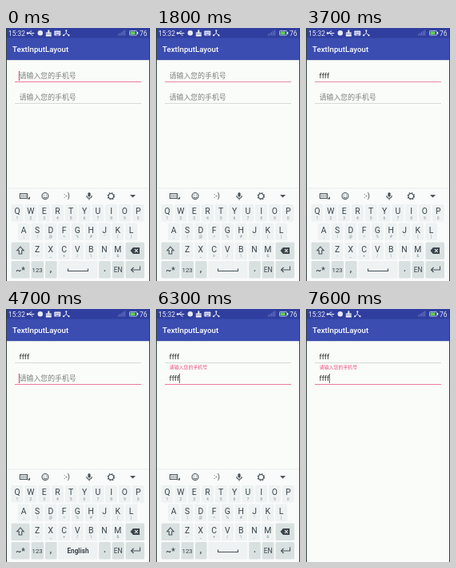
Animation, 180 px wide and 317 px high, one loop 8 s. Source, as an HTML page:

```html
<!DOCTYPE html>
<html lang="zh">
<head>
<meta charset="utf-8">
<style>
html, body { margin: 0; width: 100%; height: 100%; overflow: hidden; background: #fafcf9; }
svg { display: block; width: 100vw; height: 100vh; }
text { font-family: Roboto, "Noto Sans CJK SC", "Noto Sans CJK", sans-serif; }
.mid { text-anchor: middle; }
.icon { fill: none; stroke: #48535a; stroke-width: 1.1; }
</style>
</head>
<body>
<svg id="stage" viewBox="0 0 180 317" preserveAspectRatio="none">
  <rect width="180" height="317" fill="#fafcf9"/>
  <rect y="40" width="180" height="1" fill="#d5d9e2"/>
  <rect width="180" height="40" fill="#3b4db1"/>
  <rect width="180" height="12.5" fill="#303f9f"/>
  <text x="8" y="30" font-size="9.7" font-weight="500" fill="#fff">TextInputLayout</text>

  <g fill="#e8eaf6" font-size="8.4">
    <text x="3" y="9.5">15:32</text>
    <text x="167" y="9.5">76</text>
    <g transform="translate(-.7 0)">
      <g fill="none" stroke="#e8eaf6">
        <path d="M27 6.5H36M29 6.5L31.5 4H33M30.5 6.5L33 9H34.5"/>
        <circle cx="27.8" cy="6.5" r="1" fill="#e8eaf6"/>
      </g>
      <circle cx="43.5" cy="6.3" r="3.2"/>
      <path d="M53 2.5h2v3h2.5v2h-7v-2H53zM50.5 8h7v2.5h-7z"/>
      <g id="imeIcon">
        <rect x="61" y="3.5" width="8" height="6" rx=".7"/>
        <path d="M62 5.4h6M62 7h6" stroke="#303f9f" stroke-width=".7" stroke-dasharray="1 .7"/>
        <path d="M63.2 8.5h3.6" stroke="#303f9f" stroke-width=".7"/>
      </g>
      <g id="lastIcon">
        <path d="M76 3V6.4L72.8 9.3M76 6.4L79.2 9.3" fill="none" stroke="#e8eaf6"/>
        <circle cx="76" cy="3.3" r="1.1"/><circle cx="72.8" cy="9.2" r="1.1"/><circle cx="79.2" cy="9.2" r="1.1"/>
      </g>
    </g>
    <path d="M140.5 9.5v-2M142.5 9.5v-3.2M144.5 9.5v-4.5M146.5 9.5v-6M148.5 9.5v-7" stroke="#7480c4" stroke-width=".9"/>
    <rect x="154.5" y="3.5" width="9" height="5.6" rx=".7" fill="none" stroke="#cfd5ef" stroke-width=".8"/>
    <rect x="155.5" y="4.5" width="6" height="3.6" fill="#62d34c"/>
    <rect x="164" y="5" width="1.2" height="2.6"/>
  </g>

  <g id="fields"></g>
  <g id="keyboard"></g>
  <path d="M.5 0V317M179.5 0V317" stroke="#33413f"/>
</svg>
<script>
const LOOP = 8000, STEP = 100, PINK = '#ef7a9b', HINT = '请输入您的手机号';
const $ = id => document.getElementById(id);

function add(parent, tag, attrs = {}, content = '') {
  const el = document.createElementNS('http://www.w3.org/2000/svg', tag);
  for (const name in attrs) el.setAttribute(name, attrs[name]);
  el.textContent = content;
  parent.append(el);
  return el;
}
const set = (el, name, value) => el.setAttribute(name, value);
const show = (el, on) => set(el, 'visibility', on ? 'visible' : 'hidden');
const ramp = (t, from, to) => Math.min(1, Math.max(0, (t - from) / (to - from)));
const latest = (t, steps) => steps.filter(([at]) => t >= at).pop()[1];
const within = (t, spans) => spans.some(([from, to]) => t >= from && t < to);

function makeField(lineY) {
  const root = $('fields'), baseline = lineY - 3.6;
  const line = fill => add(root, 'rect', { x: 11, y: lineY, width: 158, height: 1, fill });
  line('#d6dad7');
  return {
    baseline,
    line: line(PINK),
    hint: add(root, 'text', { x: 16.7, y: baseline, 'font-size': 8.9, fill: '#7c807e' }, HINT),
    value: add(root, 'text', { x: 16.5, y: baseline, 'font-size': 9.1, fill: '#252827' }),
    cursor: add(root, 'rect', { y: lineY - 13, width: 1, height: 12, fill: '#d8386f' })
  };
}

const board = $('keyboard');
const KEY = '#eef2f2', FN = '#d9e0e0', INK = '#39444a';

const key = (x, y, width, fill = KEY) =>
  add(board, 'rect', { x, y, width, height: 21.5, rx: 1.5, fill });
const label = (x, y, size, content, fill = INK, weight = 400) =>
  add(board, 'text', { x, y, class: 'mid', 'font-size': size, 'font-weight': weight, fill }, content);
const icon = (d, attrs = {}) => add(board, 'path', { d, class: 'icon', ...attrs });

add(board, 'rect', { y: 201, width: 180, height: 116, fill: '#f9fbfa' });
add(board, 'rect', { y: 200.5, width: 180, height: .8, fill: '#e4e8e6' });

// Tool row
icon('M17.5 207.5H26.5V213.5H17.5Z', { 'stroke-width': .9 });
icon('M19 209.5H25.5M19 211.5H25.5', { 'stroke-dasharray': '1.1 .7' });
icon('M28 214L29.5 212.5V214Z', { 'stroke-width': .5 });
add(board, 'circle', { cx: 49, cy: 210.5, r: 4, class: 'icon' });
icon('M46.8 211.5Q49 214.5 51.2 211.5M47.4 208.8V209.8M50.6 208.8V209.8');
label(76, 213.3, 9, ':-)');
add(board, 'rect', { x: 102.4, y: 206, width: 3.2, height: 5.6, rx: 1.6, fill: '#48535a' });
icon('M100.8 210Q100.8 213.2 104 213.2T107.2 210M104 213.2V215.5');
add(board, 'circle', { cx: 131.3, cy: 210.7, r: 3.2, class: 'icon' });
add(board, 'circle', { cx: 131.3, cy: 210.7, r: 4.2, class: 'icon', 'stroke-dasharray': '1.7 1.599' });
const arrow = add(board, 'path', { d: 'M155 209H162L158.5 212.5Z' });

// Letter rows
let fKey;
[
  ['QWERTYUIOP', '1234567890', 14, 221],
  ['ASDFGHJKL', ';|@~%#"()', 22.2, 244.5],
  ['ZXCVBNM', '-_+/\\;&', 39, 268.5]
].forEach(([letters, marks, x0, y]) => [...letters].forEach((letter, i) => {
  const x = x0 + i * 16.8, cap = key(x - 7.4, y, 14.8);
  if (letter === 'F') fKey = cap;
  label(x, y + 12.3, 10.4, letter);
  label(x, y + 18.9, 5, marks[i], '#829096');
}));

key(6.6, 268.5, 23, FN);
icon('M18 274L22.2 278.8H19.8V283H16.2V278.8H13.8Z');
key(149.5, 268.5, 23.5, FN);
add(board, 'path', { d: 'M155.5 279L158.8 275H167V283H158.8Z', fill: INK });
icon('M161 277L164.7 281M164.7 277L161 281', { style: 'stroke:#fff' });

// Bottom row
key(6.6, 292, 23, FN);
label(18, 306.5, 10.5, '~*', INK, 500);
key(31.6, 292, 15.6, FN);
label(39.2, 305.5, 7.8, '123');
key(49, 292, 14.6, FN);
label(56, 305, 10, ',', INK, 700);
key(65.4, 292, 49);
const spaceMark = icon('M77.5 301.5V304.5H102.5V301.5');
const language = label(90, 305.5, 8.2, 'English', INK, 700);
key(116.2, 292, 14.6, FN);
label(123.5, 305, 10, '.', INK, 700);
key(132.6, 292, 15, FN);
label(140.2, 305.5, 8.4, 'EN');
key(149.5, 292, 23.5, FN);
icon('M167.5 298.5V303H156.5M159.5 300L156.5 303L159.5 306');

const popup = add(board, 'g');
add(popup, 'rect', { x: 58.7, y: 209.7, width: 29.6, height: 33, rx: 2, fill: '#000', opacity: .16 });
add(popup, 'rect', { x: 59.5, y: 209, width: 28, height: 32, rx: 1.5, fill: '#fbfcfc' });
add(popup, 'text', { x: 73.3, y: 232.5, class: 'mid', 'font-size': 22, fill: '#20264f' }, 'F');

const first = makeField(67), second = makeField(94);

const firstTyping = [[0, ''], [2800, 'f'], [3000, 'ff'], [3200, 'ffff']];
const secondTyping = [[0, ''], [5700, 'f'], [6000, 'ff'], [6200, 'ffff']];
const presses = [[2700, 2800], [2900, 3000], [3100, 3400], [5500, 5700], [5800, 6000], [6100, 6300]];
const blinks = [[800, 1300], [1800, 2300], [3700, 4200], [5100, 5600], [6700, 7100]];

function drawField(field, value, cursorOn) {
  field.value.textContent = value;
  set(field.cursor, 'x', Math.round(16.4 + value.length * 3.16));
  show(field.cursor, cursorOn);
}

function draw(t) {
  const cursorOn = !within(t, blinks), onSecond = t >= 4600;
  const firstText = latest(t, firstTyping), secondText = latest(t, secondTyping);
  drawField(first, firstText, cursorOn && !onSecond);
  drawField(second, secondText, cursorOn && onSecond);
  show(first.hint, !firstText);

  const focus = ramp(t, 4400, 4700);
  set(first.line, 'opacity', (1 - focus) * (1 - .2 * ramp(t, 100, 300)));
  set(second.line, 'opacity', focus);

  const floating = secondText !== '';
  set(second.hint, 'y', floating ? 75.4 : second.baseline);
  set(second.hint, 'font-size', floating ? 5.95 : 8.9);
  set(second.hint, 'fill', floating ? '#ee4c83' : '#7c807e');

  const pressed = within(t, presses);
  show(popup, pressed);
  set(fKey, 'fill', pressed ? '#bcc5c5' : KEY);

  const english = t < 4600 ? 0 : 1 - ramp(t, 4800, 5100);
  set(language, 'opacity', english);
  set(spaceMark, 'opacity', 1 - english);

  const closing = t >= 7000, slide = ramp(t, 7100, 7600);
  set(arrow, 'fill', closing ? '#58b5ea' : '#48535a');
  set(board, 'transform', `translate(0 ${117 * slide * slide})`);
  show(board, slide < 1);
  show($('imeIcon'), !closing);
  set($('lastIcon'), 'transform', `translate(${closing ? -11 : 0} 0)`);
}

function tick() {
  draw(Math.floor(performance.now() % LOOP / STEP) * STEP);
  requestAnimationFrame(tick);
}
tick();
</script>
</body>
</html>
```
